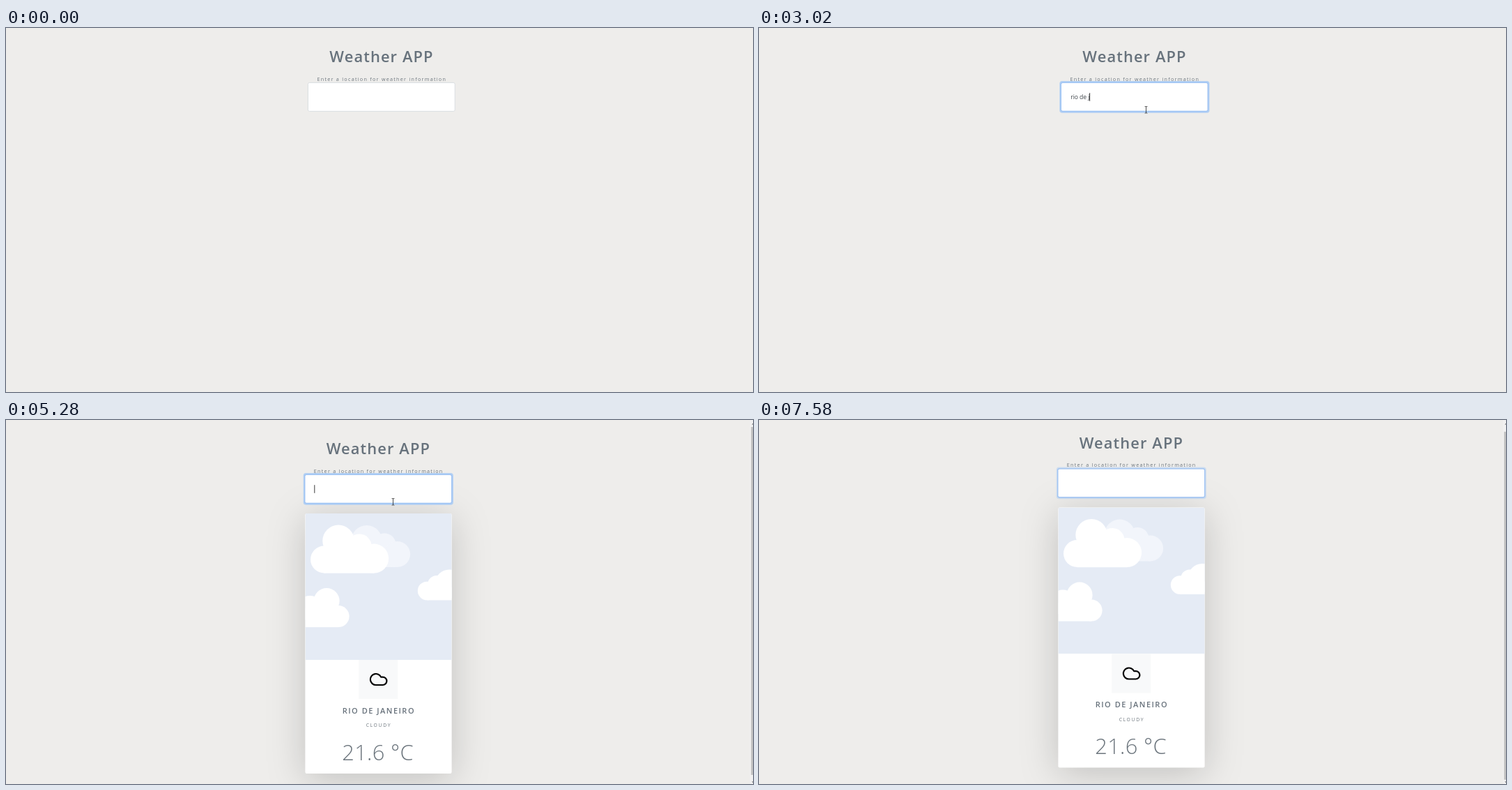
These frames come from a looping animation (1072x522 px, 7.65 s). An HTML page:

```html
<!DOCTYPE html>
<html lang="en">
<head>
<meta charset="utf-8">
<title>Weather APP</title>
<style>
  html, body { margin: 0; width: 100%; height: 100%; overflow: hidden; background: #eeedeb; }
  svg { display: block; width: 100%; height: 100%; }
  text { font-family: "Open Sans", "Noto Sans", sans-serif; fill: #6c757d; white-space: pre; }
  .mid { text-anchor: middle; }
  .title { font-size: 21.9px; font-weight: 600; letter-spacing: 1.1px; fill: #67727c; }
  .label { font-size: 7.2px; letter-spacing: 1.27px; }
  .entry { font-size: 8.6px; letter-spacing: -.05px; fill: #40464c; }
  .city { font-size: 11px; font-weight: 600; letter-spacing: 1.5px; fill: #67717b; }
  .sky { font-size: 6.8px; letter-spacing: 1.65px; }
  .temp { font-size: 30.8px; font-weight: 300; letter-spacing: .3px; }
  #popup text { font-size: 6.5px; fill: #333; }
  #cardBox { filter: drop-shadow(0 8.9px 26.8px rgba(0, 0, 0, .19)); }
  #popupBox { filter: drop-shadow(0 1px 1.5px rgba(0, 0, 0, .3)); }
</style>
</head>
<body>
<svg viewBox="0 0 1072 522">
  <defs>
    <clipPath id="pictureClip"><path d="M0 210V2.2Q0 0 2.2 0H208Q210.2 0 210.2 2.2V210Z"/></clipPath>
  </defs>
  <rect width="1072" height="522" fill="#eeedeb"/>

  <g id="page">
    <text class="title mid" x="539" y="49.3">Weather APP</text>
    <text class="label mid" x="539.3" y="75.8">Enter a location for weather information</text>

    <g id="card" transform="translate(434 134)">
      <rect id="cardBox" width="210.2" rx="2.2" fill="#fff"/>
      <g id="picture">
        <g id="clouds" clip-path="url(#pictureClip)">
          <rect width="210.2" height="210" fill="#e5ebf5"/>
        </g>
        <rect x="76.8" y="210" width="56" height="56" fill="#f8f9fa"/>
        <path d="M101.5 246A8 8 0 1 1 108.7 234.6H111.3A5.7 5.7 0 0 1 111.3 246Z"
              fill="none" stroke="#000" stroke-width="2.2" stroke-linejoin="round"/>
      </g>
      <g id="info">
        <text class="city mid" x="105.5" y="286.5">RIO DE JANEIRO</text>
        <text class="sky mid" x="105.5" y="306.2">CLOUDY</text>
        <text class="temp mid" x="104.2" y="353.5">21.6 °C</text>
      </g>
    </g>

    <rect id="glow" x="431.3" y="76" width="215.2" height="45.7" rx="3.8" fill="#b3d0f3"/>
    <rect x="433.4" y="78.4" width="210.8" height="41" rx="2.2" fill="#fff" stroke="#ced4da" stroke-width=".7"/>
    <rect id="border" x="433.3" y="78.3" width="211" height="41.2" rx="2.4" fill="none" stroke="#9dc3f5" stroke-width="1.3"/>
    <text id="entry" class="entry" x="447.2" y="102.2"></text>
    <path id="caret" d="M0 93.2V104.8" stroke="#222" stroke-width=".9"/>
  </g>

  <g id="popup">
    <path id="popupBox" d="M490 127H496L500.5 122.8 505 127H541.5V248.5H490Z" fill="#fff"/>
  </g>

  <g id="scrollbar">
    <rect x="1067.7" width="5" height="522" fill="#f1f1f1"/>
    <rect id="thumb" x="1069.2" width="3" height="499" fill="#c1c1c1"/>
    <path d="M1070.2 6.5L1072 4.7V6.5Z M1070.2 518.5L1072 520.3V518.5Z" fill="#606060"/>
  </g>

  <path id="arrow" d="M0 0V9.3L2.1 7.4 3.5 10.6 5 10 3.6 6.8H6.6Z" fill="#fff" stroke="#222" stroke-width=".7"/>
  <path id="beam" d="M-1.8 -4.8H-.5L0 -4.4 .5 -4.8H1.8M0 -4.4V4.4M-1.8 4.8H-.5L0 4.4 .5 4.8H1.8"
        fill="none" stroke="#222" stroke-width=".8"/>
</svg>

<script>
const LOOP = 7650;
const NS = "http://www.w3.org/2000/svg";
const $ = id => document.getElementById(id);

function add(parent, tag, attrs, text = "") {
  const el = document.createElementNS(NS, tag);
  for (const key in attrs) el.setAttribute(key, attrs[key]);
  el.textContent = text;
  parent.append(el);
}

// A cloud is a flat base [left, right, top, bottom] plus circles [x, y, r].
function cloud(fill, [left, right, top, bottom], circles) {
  add($("clouds"), "rect", { x: left, y: top, width: right - left, height: bottom - top, fill });
  for (const [cx, cy, r] of circles) add($("clouds"), "circle", { cx, cy, r, fill });
}
cloud("#f2f5fb", [70, 132.2, 46, 77], [[88.2, 39, 22], [113.7, 45, 16.5], [132.2, 58.5, 18.5]]);
cloud("#fff", [27, 99.2, 46, 85.7], [[27.2, 66, 19.6], [47.7, 39.3, 22.8], [77.7, 47, 17.5], [98.7, 64.6, 21]]);
cloud("#fff", [0, 47.7, 136, 163.1], [[6.7, 136, 18], [30.7, 125.5, 18.5], [47.7, 147.6, 15.5]]);
cloud("#fff", [174.7, 211, 106, 124.4], [[174.7, 111, 13.3], [188.7, 102, 13], [206.7, 101, 20.5]]);

["warszawa", "kiev", "Poznań", "Poznań,", "dupa", "taiwan"].forEach((name, i) =>
  add($("popup"), "text", { x: 496, y: 142 + i * 19.5 }, name));

const PHRASE = "rio de janeiro";
const KEYS = [1750, 2030, 2230, 2360, 2490, 2620, 2770, 3020, 3090, 3280, 3410, 3630, 3830, 4030];
const SUBMIT = 4230, CARD = 5020, LOADED = 5280, BLUR = 7580;

// Pointer legs: start, end, from, to, easing
const outSoft = p => 1 - (1 - p) ** 1.3;
const inOut = p => p * p * (3 - 2 * p);
const LEGS = [
  [130, 880, [1037, 512], [560, 109], inOut],
  [940, 1230, [560, 109], [555.5, 117.3], inOut],
  [5490, 6230, [555.5, 117.3], [606, 287], outSoft],
  [6430, 7050, [606, 287], [1045, 498], inOut],
  [7050, 7120, [1045, 498], [1076, 526], p => p]
];

const ramp = (t, a, b) => Math.min(1, Math.max(0, (t - a) / (b - a)));
const show = (id, on) => $(id).setAttribute("visibility", on ? "visible" : "hidden");
const fade = (id, value) => $(id).setAttribute("opacity", value);
const move = (id, x, y) => $(id).setAttribute("transform", `translate(${x} ${y})`);

function caretOn(t) {
  if (t < 880 || t >= BLUR) return false;
  if (t < 1750) return t < 1420;
  if (t < 4560) return true;
  return Math.floor((t - 4560) / 528) % 2 === 1;
}

function drawPointer(t) {
  const leg = LEGS.filter(l => t >= l[0]).pop();
  const on = leg && t < 7120;
  let x = 0, y = 0;
  if (on) {
    const [start, end, from, to, ease] = leg;
    const p = ease(ramp(t, start, end));
    x = from[0] + (to[0] - from[0]) * p;
    y = from[1] + (to[1] - from[1]) * p;
  }
  const inField = x > 433 && x < 644 && y > 78 && y < 120;
  show("arrow", on && !inField);
  show("beam", on && inField);
  move("arrow", x, y);
  move("beam", x, y);
}

function draw(t) {
  const loaded = t >= LOADED;
  const scroll = 8.5 * (1 - (1 - ramp(t, 6250, 6430)) ** 2);
  move("page", loaded ? -4.6 : 0, -scroll);
  show("scrollbar", loaded);
  $("thumb").setAttribute("y", 10 + scroll * .8);

  const focus = ramp(t, 900, 1050);
  fade("glow", t < BLUR ? focus : .55);
  fade("border", focus);

  const typed = t < SUBMIT ? KEYS.filter(k => t >= k).length : 0;
  $("entry").textContent = PHRASE.slice(0, typed);
  move("caret", 447.4 + (typed ? $("entry").getComputedTextLength() : 0), 0);
  show("caret", caretOn(t));

  show("popup", t >= 880 && t < 1960);
  fade("popup", 1 - ramp(t, 1750, 1960));

  $("card").style.display = t >= CARD ? "" : "none";
  $("picture").style.display = loaded ? "" : "none";
  $("cardBox").setAttribute("height", loaded ? 373 : 107);
  move("info", 0, loaded ? 0 : -266.3);

  drawPointer(t);
}

const begin = performance.now();
function tick() {
  draw((performance.now() - begin) % LOOP);
  requestAnimationFrame(tick);
}
tick();
</script>
</body>
</html>
```
